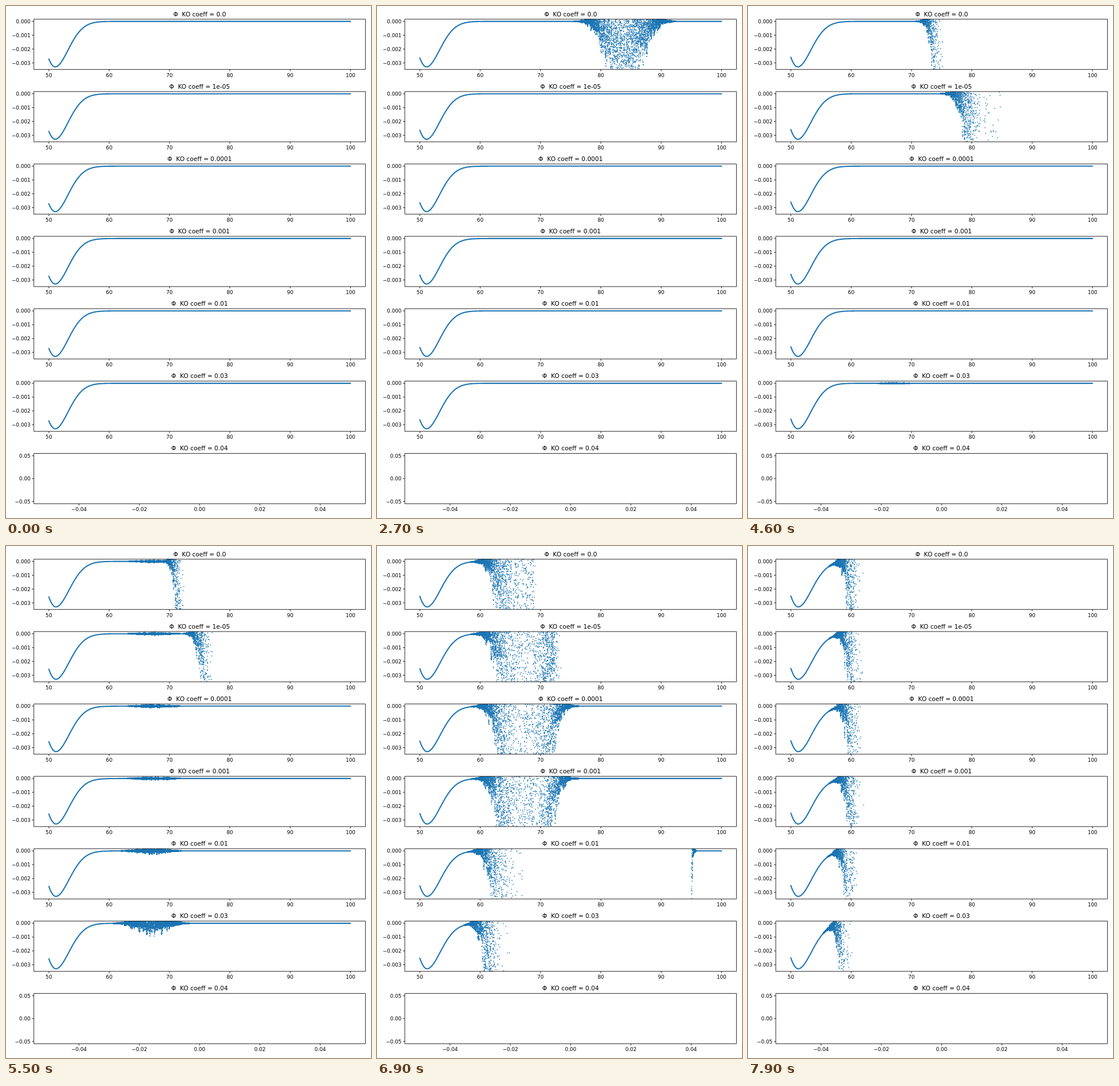
Write an HTML page with a canvas that moves like this. It is 632 px wide and 885 px high and loops after 8 s.

```html
<!DOCTYPE html>
<html lang="en">
<head>
<meta charset="utf-8">
<title>KO coefficient comparison</title>
<style>
  html, body { margin: 0; width: 100%; height: 100%; overflow: hidden; background: #fff; }
  canvas, svg { position: absolute; left: 0; top: 0; width: 632px; height: 885px; }
  text {
    font: 8.78px "DejaVu Sans", sans-serif;
    font-variant-ligatures: none;
    white-space: pre;
    text-anchor: middle;
  }
  text.title { font-size: 10.53px; }
  text.end { text-anchor: end; }
  path { fill: none; stroke: #000; stroke-width: 0.85; }
</style>
</head>
<body>
<canvas id="plot" width="632" height="885"></canvas>
<svg id="axes" viewBox="0 0 632 885"></svg>
<script>
const LOOP = 8000, STEP = 100;
const LEFT = 48.1, WIDTH = 574.3, TOP = 22.8, HEIGHT = 86.9, PITCH = 125.1;
const X50 = 74.2, UNIT = 10.447, ZERO = 3.8, MILLI = 23.9;
const PER_UNIT = 440, COUNT = 50 * PER_UNIT, COLUMN = 50, DOT = 1.5;
const LIMIT = 1.75, FLOOR = -1.7, SWEEP = 0.35;

// Unstable modes: centre, width, and log10 amplitude over time.
const inner = level => ({
  mid: 67.4, width: 5,
  keys: [[0, -9], [6200, level], [6900, 1.5], [7080, LIMIT], [7900, 3.2]]
});
const panels = [
  { label: "0.0", modes: [inner(0), {
    mid: 84, width: 5.2,
    keys: [[0, -4], [1600, -1.5], [3500, 2.7], [4600, 4.8], [6200, 8.6], [7900, 12]]
  }] },
  { label: "1e-05", modes: [inner(0.06), {
    mid: 84.8, width: 5.2,
    keys: [[0, -9], [3500, -0.65], [4600, 2], [6200, 5.7], [6900, 6.85], [7900, 9]]
  }] },
  { label: "0.0001", modes: [inner(0.08)] },
  { label: "0.001", modes: [inner(0.1)] },
  { label: "0.01", modes: [{
    mid: 67, width: 4.8,
    keys: [[0, -9], [6200, 0.45], [6820, LIMIT], [6900, 1.85], [7900, 3.5]]
  }] },
  { label: "0.03", modes: [{
    mid: 67, width: 4.9,
    keys: [[0, -8], [4600, -1.4], [6200, 1.05], [6900, 2.25], [7900, 3.95]]
  }] },
  { label: "0.04", modes: [] }
];

function lerp(keys, v) {
  let i = 1;
  while (i < keys.length - 1 && v > keys[i][0]) i++;
  const [a, b] = [keys[i - 1], keys[i]];
  return a[1] + (b[1] - a[1]) * (v - a[0]) / (b[0] - a[0]);
}

for (const { modes } of panels)
  for (const m of modes) m.burst = lerp(m.keys.map(([t, h]) => [h, t]), LIMIT);

const hash = n => {
  const v = Math.sin(n * 12.9898) * 43758.5453;
  return v - Math.floor(v);
};

// The smooth pulse, in thousandths.
function pulse(x, t) {
  const p = t / LOOP, c = 51.05 + 0.17 * p, depth = 3.29;
  if (x < c) {
    const start = 2.72 - 0.22 * p;
    return -depth + (depth - start) * ((c - x) / (c - 50)) ** 2;
  }
  const s = 2.87 + 0.1 * p, u = (x - c) / s + 1;
  return -depth * u * Math.exp(0.5 - u * u / 2);
}

// Log amplitude of the noise at x, or null where the solution is lost.
function noiseLevel(x, waves, limit) {
  let level = -9;
  for (const { mid, width, height, front } of waves) {
    let l = height - ((x - mid) / width) ** 2;
    if (front) {
      if (x > mid && x < front) return null;
      if (x >= front) l = Math.max(l, 0.9 - 3 * (x - front));
    }
    if (l > limit) return null;
    level = Math.max(level, l);
  }
  return level;
}

const ctx = document.getElementById("plot").getContext("2d");

function drawPanel(index, t) {
  const top = TOP + PITCH * index, zero = top + ZERO;
  const waves = panels[index].modes.map(m => ({
    mid: m.mid, width: m.width,
    height: lerp(m.keys, t),
    front: t > m.burst ? m.mid + SWEEP * (t - m.burst) : 0
  }));
  if (!waves.length) return;
  ctx.save();
  ctx.beginPath();
  ctx.rect(LEFT, top, WIDTH, HEIGHT);
  ctx.clip();
  ctx.beginPath();
  let pen = false;
  for (let i = 0; i <= COUNT; i++) {
    const x = 50 + i / PER_UNIT, px = X50 + UNIT * (x - 50);
    const seed = i + (t / STEP) * 8117 + index * 977;
    const level = noiseLevel(x, waves, 1.5 + 0.65 * hash(seed + 0.37));
    if (level === null) { pen = false; continue; }
    if (level < FLOOR) {
      if (pen && i % 8) continue;
      const py = zero - MILLI * pulse(x, t);
      if (pen) ctx.lineTo(px, py); else ctx.moveTo(px, py);
      pen = true;
      continue;
    }
    pen = false;
    const column = Math.floor(i / COLUMN) + index * 311 + 17;
    const spike = 10 ** (level + 0.08 - 0.55 * hash(column));
    const y = pulse(x, t) + spike * (2 * hash(seed) - 1);
    const py = zero - MILLI * y;
    if (py > top - 1 && py < top + HEIGHT + 1)
      ctx.fillRect(px - DOT / 2, py - DOT / 2, DOT, DOT);
  }
  ctx.stroke();
  ctx.restore();
}

function draw(t) {
  ctx.clearRect(0, 0, 632, 885);
  ctx.fillStyle = ctx.strokeStyle = "#1f77b4";
  ctx.lineWidth = 2.1;
  ctx.lineCap = "round";
  ctx.lineJoin = "round";
  panels.forEach((_, i) => drawPanel(i, t));
}

function buildAxes() {
  const svg = [];
  const text = (x, y, s, cls = "") => svg.push(`<text x="${x}" y="${y}" class="${cls}">${s}</text>`);
  const minus = s => s.replace("-", "\u2212");
  panels.forEach(({ label, modes }, i) => {
    const top = TOP + PITCH * i, bottom = top + HEIGHT;
    let d = `M${LEFT} ${top}h${WIDTH}v${HEIGHT}h${-WIDTH}z`;
    const xTick = (x, s) => {
      d += `M${x} ${bottom}v3.1`;
      text(x, bottom + 13, minus(s));
    };
    const yTick = (y, s) => {
      d += `M${LEFT} ${y}h-3.1`;
      text(42.4, y + 3.2, minus(s), "end");
    };
    if (modes.length) {
      for (let v = 50; v <= 100; v += 10) xTick(X50 + UNIT * (v - 50), String(v));
      for (let k = 0; k < 4; k++) yTick(top + ZERO + MILLI * k, (k ? "-" : "") + (k / 1000).toFixed(3));
    } else {
      const midX = LEFT + WIDTH / 2, midY = top + HEIGHT / 2;
      for (let k = -2; k <= 2; k++) xTick(midX + 104.4 * k, (k / 50).toFixed(2));
      for (let k = -1; k <= 1; k++) yTick(midY - 39.5 * k, (k / 20).toFixed(2));
    }
    text(LEFT + WIDTH / 2, top - 5.2, `\u03a6  KO coeff = ${label}`, "title");
    svg.push(`<path d="${d}"/>`);
  });
  document.getElementById("axes").innerHTML = svg.join("");
}

buildAxes();
const origin = performance.now();
let shown = -1;
function tick() {
  const t = Math.floor(((performance.now() - origin) % LOOP) / STEP) * STEP;
  if (t !== shown) draw(shown = t);
  requestAnimationFrame(tick);
}
tick();
</script>
</body>
</html>
```
